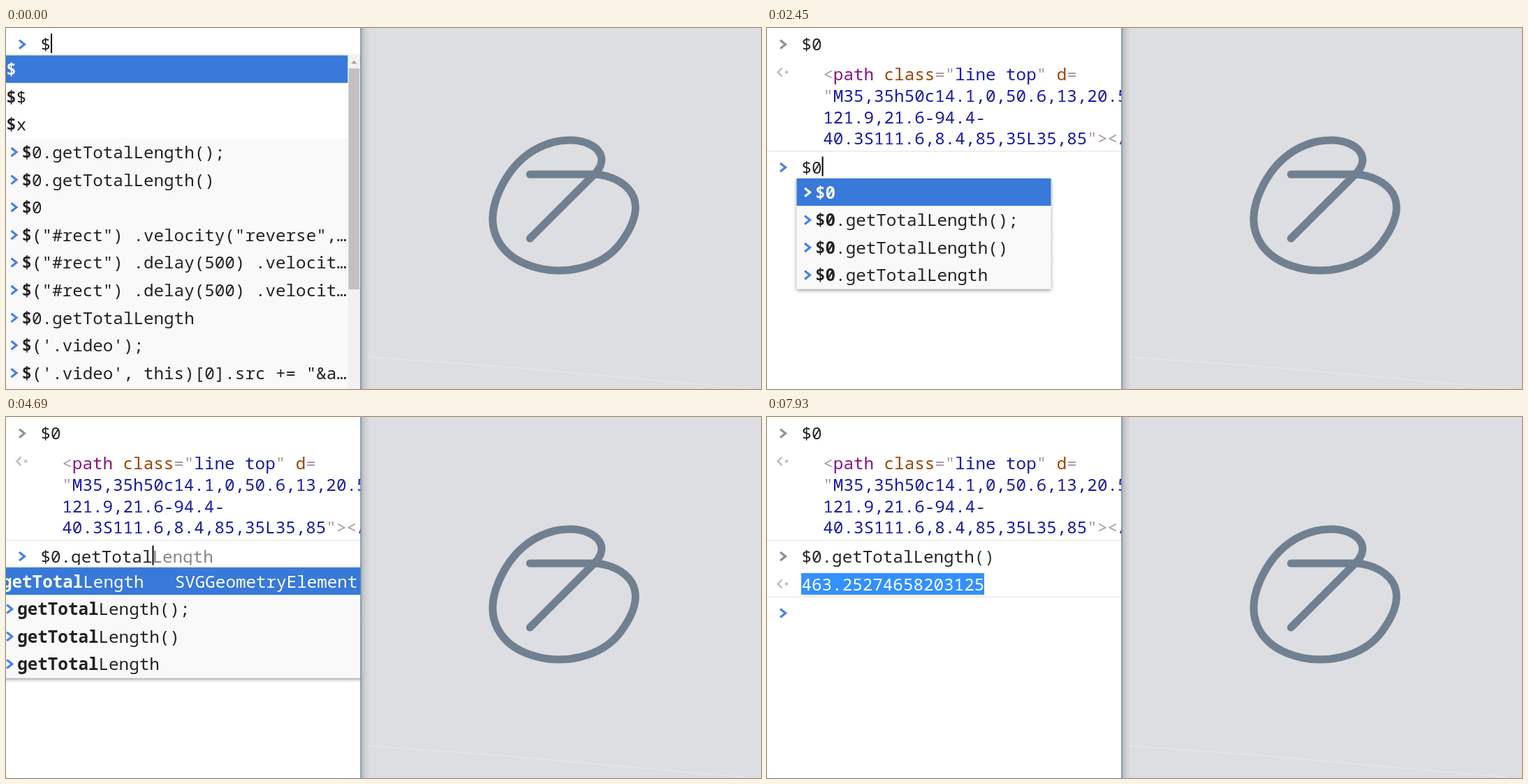
Recreate the animation shown at these times as an HTML page. Size 1081 by 518 pixels, loop 8.64 s.

```html
<!DOCTYPE html>
<html lang="en">
<head>
<meta charset="utf-8">
<title>Measuring a path in the console</title>
<style>
html, body { margin: 0; width: 100%; height: 100%; overflow: hidden; background: #dddee1; }
svg { display: block; }
text { font: 24.24px "Noto Sans Mono", "DejaVu Sans Mono", monospace; white-space: pre; fill: #222; }
.b { font-weight: 700; }
.menu { filter: drop-shadow(0 2px 2.5px rgba(0,0,0,.38)); }
</style>
</head>
<body>
<svg width="1081" height="518" viewBox="0 0 1081 518">
  <defs>
    <clipPath id="pane"><rect width="508" height="518"/></clipPath>
    <linearGradient id="edge">
      <stop offset="0" stop-color="#000" stop-opacity=".2"/>
      <stop offset=".4" stop-color="#000" stop-opacity=".08"/>
      <stop offset="1" stop-color="#000" stop-opacity="0"/>
    </linearGradient>
  </defs>
  <rect width="1081" height="518" fill="#dddee1"/>
  <path d="M518 472L700 485L1060 517" fill="none" stroke="#fff" stroke-opacity=".3"/>
  <path transform="translate(685.8 145.6) scale(1.84)" fill="none" stroke="#708090" stroke-width="6"
    stroke-linecap="round" stroke-miterlimit="10"
    d="M35,35h50c14.1,0,50.6,13,20.5,53.5s-121.9,21.6-94.4-40.3S111.6,8.4,85,35L35,85"/>
  <rect x="508" width="13" height="518" fill="url(#edge)"/>
  <rect width="508" height="518" fill="#fff"/>
  <g id="console" clip-path="url(#pane)"></g>
  <rect x="507.2" width="1.6" height="518" fill="#7198b2"/>
</svg>
<script>
const LOOP = 8640, CW = 14.544, ROW = 39.6, LEFT = 49.5;
const BLUE = '#4480ee', GREY = '#929292';
const view = document.getElementById('console');

const esc = s => s.replace(/&/g, '&amp;').replace(/</g, '&lt;');
const rect = (x, y, w, h, fill) => `<rect x="${x}" y="${y}" width="${w}" height="${h}" fill="${fill}"/>`;
const span = (s, fill, cls = '') => `<tspan class="${cls}" fill="${fill}">${esc(s)}</tspan>`;
// y is the middle of the capitals
const text = (x, y, inner) => `<text x="${x}" y="${y + 8.5}">${inner}</text>`;
const chevron = (x, y, color) =>
  `<path d="M${x - 4} ${y - 6}l7.5 6l-7.5 6" fill="none" stroke="${color}" stroke-width="3.2"/>`;
const returned = y =>
  `<path d="M21.5 ${y - 6}l-6 6l6 6" fill="none" stroke="#c2c2c6" stroke-width="2.8"/>` +
  `<circle cx="28" cy="${y}" r="2.3" fill="#c2c2c6"/>`;
const rule = y => rect(0, y, 508, 2, '#eeeeef');

// Suggestions: ">" marks history, "|" splits off the type label
const history = ['>$0.getTotalLength();', '>$0.getTotalLength()'];
const graphics = ['getCTM', 'getScreenCTM'];
const geometry = ['getPathSegAtLength|SVGPathEleme…', 'getPointAtLength|SVGGeometryElem…', 'getTotalLength'];
const found = ['>getTotalLength();', '>getTotalLength()', '>getTotalLength'];
const best = 'getTotalLength|SVGGeometryElement';
const small = { x: 42.5, right: 406.5 };
const tall = { x: -3.5, right: 507, thumb: 56 };
const wide = { x: -10.3, right: 530 };
const menus = {
  dollar: { x: -4, right: 507, thumb: 120, rows: ['$', '$$', '$x', ...history, '>$0',
    '>$("#rect") .velocity("reverse",…', '>$("#rect") .delay(500) .velocit…',
    '>$("#rect") .delay(500) .velocit…', '>$0.getTotalLength', ">$('.video');",
    `>$('.video', this)[0].src += "&a…`] },
  zero: { ...small, rows: ['>$0', ...history, '>$0.getTotalLength'] },
  dot: { ...tall, rows: [...geometry, 'pathLength', 'farthestViewportElement|SVGGraph…', 'getBBox', ...graphics] },
  g: { ...tall, rows: [...geometry, 'pathLength', 'getBBox|SVGGraphicsElement', ...graphics, 'systemLanguage'] },
  ge: { ...tall, rows: [...geometry, 'getBBox|SVGGraphicsElement', ...graphics, 'systemLanguage', 'getAttribute|Element'] },
  get: { ...tall, rows: [...geometry, 'getBBox|SVGGraphicsElement', ...graphics, 'getAttribute|Element', 'getAttributeNS'] },
  getT: { ...wide, rows: [best, '__defineGetter__|Object', '__lookupGetter__', ...found] },
  total: { ...wide, rows: [best, ...found] },
  open: { ...small, rows: history },
  closed: { ...small, rows: [...history].reverse() }
};

function marked(s, query, color) {
  const at = query ? s.toLowerCase().indexOf(query.toLowerCase()) : -1;
  if (at < 0) return span(s, color);
  const end = at + query.length;
  return span(s.slice(0, at), color) + span(s.slice(at, end), color, 'b') + span(s.slice(end), color);
}

function drawMenu(menu, top, query) {
  const { x, right, thumb, rows } = menu;
  const h = thumb ? 530 - top : rows.length * ROW;
  const inner = thumb ? 489.5 : right;
  const past = rows[rows.length - 1][0] === '>';
  let out = rect(x, top, right - x, h, past ? '#f9f9f9' : '#fff');
  rows.forEach((row, i) => {
    const y = top + i * ROW, mid = y + 20.3, old = row[0] === '>';
    const [name, type] = (old ? row.slice(1) : row).split('|');
    const color = i ? '#222' : '#fff';
    out += rect(x, y, inner - x, ROW + (i ? 0.4 : 0), i ? (old ? '#f9f9f9' : '#fff') : '#3879d9');
    if (old) out += chevron(x + 15.5, mid - .3, i ? BLUE : '#fff');
    out += text(x + (old ? 26.5 : 4.3), mid, marked(name, query, color));
    if (type) out += text((thumb ? 480.5 : 503.5) - type.length * CW, mid, span(type, i ? '#999' : '#fff'));
  });
  if (thumb) {
    const long = top < 100 ? 317 : thumb;
    out += rect(489.5, top, 17.5, h, '#f1f1f1') + rect(490.5, top + 18.7, 15.5, long, '#c1c1c1') +
      `<path d="M494 ${top + 12}l4.3 -4.5l4.3 4.5z" fill="#a3a3a3"/>`;
  }
  return `<g class="menu">${out}</g>`;
}

function drawInput(y, s) {
  const word = s.text.split('.')[1] || '';
  const ghost = s.full ? s.full.slice(word.length) : '';
  const paren = s.text.endsWith('()') ? s.text.length - 2 : s.text.length;
  let out = chevron(23, y, BLUE) +
    text(LEFT, y, span(s.text.slice(0, paren), '#222') + span(s.text.slice(paren), '#24402c') + span(ghost, '#858585'));
  if (s.text) out += rect(40, y + 12.3, 468, 6, '#fff');
  if (s.caret) out += rect(LEFT + s.text.length * CW, y - 15.5, 2, 28, '#000');
  if (s.menu) out += drawMenu(menus[s.menu], y + 15.8, s.query);
  return out;
}

function drawElement() {
  const pale = '#a894a6', tag = '#881280', attr = '#994500', val = '#1a1aa6', x = 80.3;
  return chevron(23, 23.5, GREY) + text(LEFT, 23.5, '$0') + returned(63.5) +
    text(x, 66, span('<', pale) + span('path', tag) + span(' class', attr) + span('="', pale) +
      span('line top', val) + span('"', pale) + span(' d', attr) + span('=', pale)) +
    text(x, 97, span('"', pale) + span('M35,35h50c14.1,0,50.6,13,20.5', val)) +
    text(x, 128, span('121.9,21.6-94.4-', val)) +
    text(x, 158.5, span('40.3S111.6,8.4,85,35L35,85', val) + span('"><', pale) + span('/', tag)) +
    rule(175.8);
}

function drawResult(picked) {
  const value = '463.25274658203125';
  return chevron(23, 200, '#918ca0') +
    text(LEFT, 200, span('$0.getTotalLength', '#222') + span('()', '#24402c')) + returned(239.5) +
    (picked ? rect(49, 224, 262, 31, '#3390ff') : '') +
    text(LEFT, 240, span(value, picked ? '#fff' : '#1c00cf')) + rule(257.3);
}

// Timeline
const steps = [];
const add = (at, text, menu, query, more) =>
  steps.push({ at, text, menu, query, caret: true, stage: 1, ...more });
const first = { full: 'getPathSegAtLength' }, second = { full: 'getTotalLength' };

add(0, '$', 'dollar', '$', { stage: 0 });
add(380, '$0', 'zero', '$0', { stage: 0 });
add(740, '$0', '', '', { stage: 0 });
add(790, '');
add(1250, '', '', '', { caret: false });
add(1820, '');
add(2090, '$');
add(2140, '$', 'dollar', '$');
add(2420, '$0', 'dollar', '$');
add(2450, '$0', 'zero', '$0');
add(2650, '$0.', 'dot', '', first);
add(3200, '$0.g', 'dot', '', first);
add(3300, '$0.g', 'g', 'g', first);
add(3430, '$0.ge', 'g', 'g', first);
add(3480, '$0.ge', 'ge', 'ge', first);
add(3660, '$0.get', 'get', 'get', first);
add(3990, '$0.getT', 'getT', 'getT', second);
add(4270, '$0.getTo', 'getT', 'getT', second);
[4320, 4370, 4610, 4690, 5150, 5440, 5590, 5720, 5870, 6050].forEach((at, i) => {
  const word = second.full.slice(0, 5 + i);
  add(at, '$0.' + word, 'total', word, second);
});
add(6510, '$0.getTotalLength(', 'open', '$0.getTotalLength(', { full: 'getTotalLength();' });
add(6700, '$0.getTotalLength()', 'closed', '$0.getTotalLength()');
add(7260, '$0.getTotalLength()');
add(7390, '', '', '', { stage: 2 });
add(7870, '', '', '', { stage: 2, caret: false });
add(7930, '', '', '', { stage: 2, caret: false, picked: true });

const promptY = [23.5, 200, 281.5];
let shown;
function render(t) {
  const s = steps.filter(step => step.at <= t).pop();
  if (s === shown) return;
  shown = s;
  view.innerHTML = (s.stage > 0 ? drawElement() : '') +
    (s.stage > 1 ? drawResult(s.picked) : '') + drawInput(promptY[s.stage], s);
}

const start = performance.now();
function tick() {
  render((performance.now() - start) % LOOP);
  requestAnimationFrame(tick);
}
tick();
</script>
</body>
</html>
```
